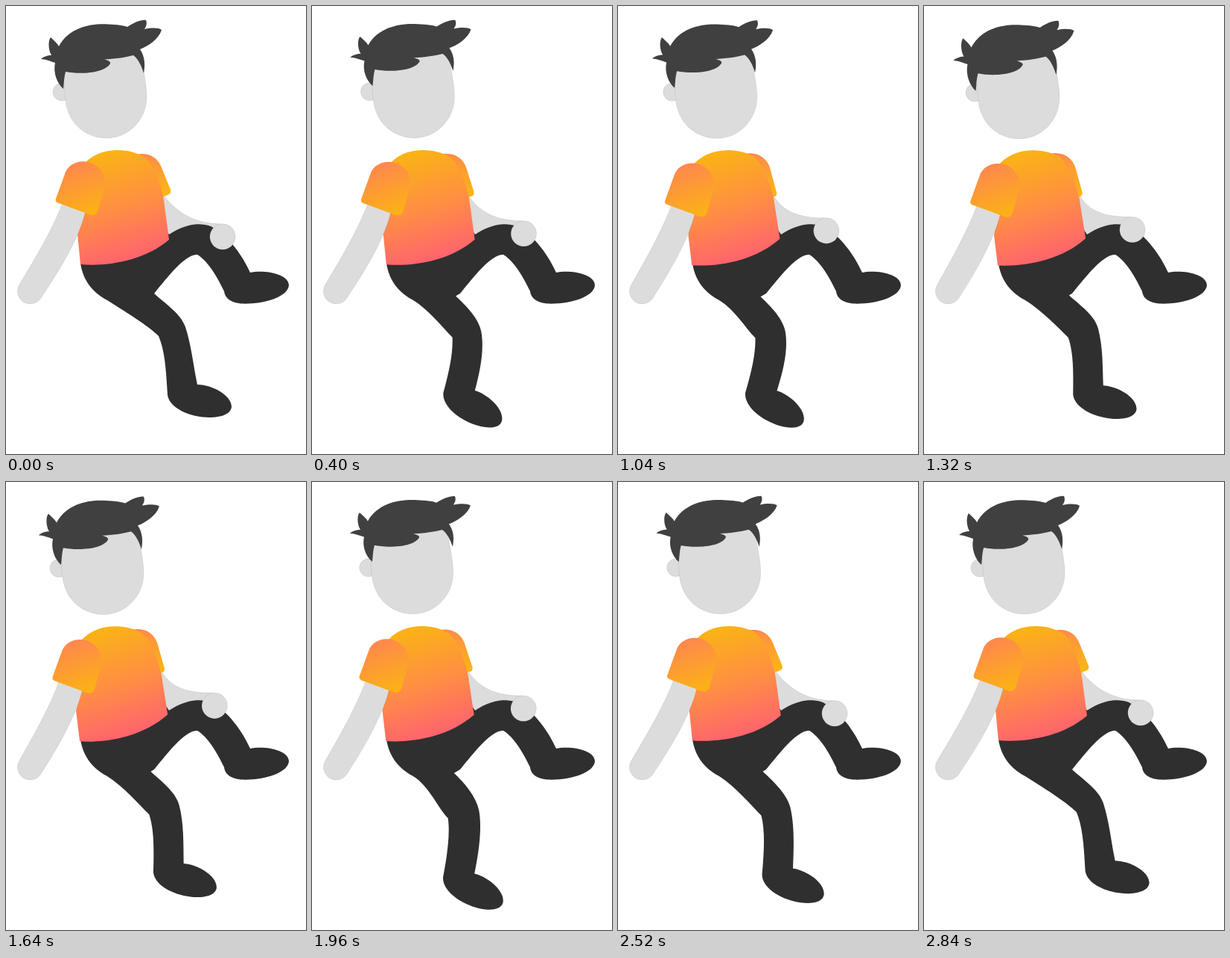
These frames come from a looping animation (403x600 px, 2.88 s). An HTML page:

```html
<!DOCTYPE html>
<html lang="en">
<head>
<meta charset="utf-8">
<title>Seated figure</title>
<style>
  html, body { margin: 0; width: 100%; height: 100%; overflow: hidden; background: #fff; }
  svg { display: block; width: 100%; height: 100%; }
  .skin { fill: #dcdcdc; stroke: #000; stroke-opacity: .1; stroke-width: .7; }
  .dark { fill: #2f2f2f; }
</style>
</head>
<body>
<svg viewBox="0 0 403 600">
  <defs>
    <linearGradient id="shirtFill" gradientUnits="userSpaceOnUse" x1="133" y1="195" x2="174" y2="342">
      <stop offset="0" stop-color="#fab414"/>
      <stop offset=".5" stop-color="#ff8f42"/>
      <stop offset="1" stop-color="#ff6170"/>
    </linearGradient>
    <linearGradient id="leftFill" gradientUnits="userSpaceOnUse" x1="92" y1="208" x2="115" y2="278">
      <stop offset="0" stop-color="#ff8650"/>
      <stop offset="1" stop-color="#fbb214"/>
    </linearGradient>
    <linearGradient id="rightFill" gradientUnits="userSpaceOnUse" x1="186" y1="198" x2="209" y2="252">
      <stop offset="0" stop-color="#ff8a4c"/>
      <stop offset="1" stop-color="#fbb414"/>
    </linearGradient>
  </defs>

  <path id="forearm" class="skin"/>
  <g id="rightShoulder">
    <path id="rightSleeve" fill="url(#rightFill)" d="M172 200C190 194 203 203 208 214L221 246C222 250 221 252 217 253L205 258Z"/>
  </g>

  <path class="dark" d="M100 344C103 368 118 385 136 394L170 402L199 385C218 362 240 333 257 333C272 342 285 365 293 382C294 392 303 397 315 398.500C345 400 379 390 380 374C380 358 345 353 328 357C318 335 300 308 275 295C258 289 240 293 219 306L215 300Z"/>
  <path id="leg" class="dark"/>

  <path id="torso" fill="url(#shirtFill)" d="M100 346L96 305C100 290 104 280 106 270V210C120 196 137 193 150 193C165 193 177 197 187 203C200 215 209 243 212 260L219 313C185 342 135 349 100 346Z"/>
  <path id="leftArm" class="skin" d="M75 266C62 300 38 340 18 373A17 17 0 0 0 47 391C75 350 98 310 106 278L100 250Z"/>
  <path id="leftSleeve" fill="url(#leftFill)" d="M67 258L79 225C86 203 120 202 131 226C134 233 133 239 132 243L124 272C122 279 119 281 113 279.500L72 264.500C67 263 66 261 67 258Z"/>
  <circle id="hand" class="skin" r="17.200"/>

  <g id="face" class="skin">
    <circle cx="75" cy="115" r="12"/>
    <path d="M79 80C78 110 79 122 80 127C84 160 110 177 135 177C165 177 189 152 189 122C189 110 187 100 185 88L180 60H90Z"/>
  </g>
  <path id="hair" fill="#404040" d="M77 111C69 104 63 90 66 76C60 74 52 71 47 71C50 68 56 66 61 66C56 57 57 45 60 42C64 46 69 50 71 54C85 28 115 23 138 24.500C150 25 158 26 163 28C172 22 182 18 188 19C190 24 188 28 186 31C196 29 205 29 209 32C205 45 190 54 180 58C187 68 187 80 185 90C182 80 177 70 171 66C160 69 145 71 132 71.500C138 73 141 75 140 77C133 90 100 92 80 88C78 95 78 102 77 111Z"/>
</svg>
<script>
const LOOP = 2880, STEP = 40;

// Rows are [time, ...values], eased with a half cosine between rows.
// Leg: back of knee x y, front of knee x y, heel x y, foot angle.
const LEG = [
  [0,    205, 442, 241, 430, 217, 521, 0],
  [720,  177, 445, 218, 442, 148, 515, 27.3],
  [1440, 195, 444, 235, 431, 204, 521, 0.6],
  [2160, 180, 451.5, 222, 442, 170, 531, 15.5],
  [2880, 205, 442, 241, 430, 217, 521, 0]
];
// Head: face shift, hair shift, hair height, drop.
const HEAD = [
  [0,    0,   0,    1,    0],
  [480,  2.6, 4.8,  .955, -.3],
  [760,  2,   5,    .95,  -.3],
  [1340, -7,  -7.5, 1.02, 1],
  [2060, 1,   4.5,  .95,  -.2],
  [2480, 2.7, 4.8,  .955, -.3],
  [2880, 0,   0,    1,    0]
];
const HAND = [
  [0,    291, 309],
  [720,  279.7, 302],
  [1440, 280, 299.5],
  [1560, 280, 299.5],
  [2520, 291, 310],
  [2880, 291, 309]
];

const part = Object.fromEntries(
  [...document.querySelectorAll('svg [id]')].map(el => [el.id, el]));
const set = (name, attr, value) => part[name].setAttribute(attr, value);

function sample(rows, t) {
  const i = rows.findIndex(row => row[0] > t);
  const a = rows[i - 1], b = rows[i];
  const k = (1 - Math.cos(Math.PI * (t - a[0]) / (b[0] - a[0]))) / 2;
  return a.slice(1).map((v, n) => v + (b[n + 1] - v) * k);
}

function legPath([kx, ky, fx, fy, hx, hy, angle]) {
  const c = Math.cos(angle * Math.PI / 180), s = Math.sin(angle * Math.PI / 180);
  const foot = (x, y) => [hx + x * c - y * s, hy + x * s + y * c];
  const [ax, ay] = foot(40, -14);
  const front = (ax - fx) / (ay - fy), back = (hx - kx) / (hy - ky);
  const bend = .22 + front / 2, ankle = 1.5 * front - .1;
  const calf = .25 + 1.2 * back, heel = 1.1 * back - .1;
  const cx = 199 + (kx - 205) * .36, cy = 385 + (205 - kx) * .22;
  return `M136 394L150 370L${cx + 6} 368L${cx} ${cy}` +
    `C${cx + 14} ${cy + 13} ${fx - bend * 18} ${fy - 18} ${fx} ${fy}` +
    `C${fx + bend * 25} ${fy + 25} ${ax - ankle * 25} ${ay - 25} ${ax} ${ay}` +
    `C${foot(58, -14)} ${foot(85, -1)} ${foot(86, 15)}` +
    `C${foot(86, 25)} ${foot(73, 30)} ${foot(56, 30)}` +
    `C${foot(33, 30)} ${foot(3, 19)} ${hx} ${hy}` +
    `C${hx - heel * 25} ${hy - 25} ${kx + calf * 22} ${ky + 22} ${kx} ${ky}` +
    `C${kx - 14} ${ky - 14} 158 408 136 394Z`;
}

function draw(t) {
  const lean = (1 - Math.cos(2 * Math.PI * t / LOOP)) / 2;
  const sway = `translate(${-lean} 0) rotate(${-1.5 * lean} 155 346)`;
  set('torso', 'transform', sway);
  set('rightShoulder', 'transform', sway);
  set('leftArm', 'transform', `rotate(${-1.6 * lean} 32 382)`);
  set('leftSleeve', 'transform', `translate(${-4.5 * lean} ${2.8 * lean})`);

  const [x, y] = sample(HAND, t);
  const pull = 291 - x;
  set('rightSleeve', 'transform', `rotate(${pull * .72} 185 212)`);
  set('hand', 'cx', x);
  set('hand', 'cy', y);
  set('forearm', 'd', `M${213 - pull * .3} 255C${228 - pull * .5} 275 ${x - 38} ${y - 17} ${x - 2} ${y - 17.2}` +
    `L${x} ${y}L260 310L205 318L200 260Z`);

  set('leg', 'd', legPath(sample(LEG, t)));

  const [face, hair, height, drop] = sample(HEAD, t);
  set('face', 'transform', `translate(${face} ${drop})`);
  set('hair', 'transform', `translate(${hair} ${24 + drop}) scale(1 ${height}) translate(0 -24)`);
}

const start = performance.now();
function tick() {
  const t = (performance.now() - start) % LOOP;
  draw(Math.floor(t / STEP) * STEP);
  requestAnimationFrame(tick);
}
tick();
</script>
</body>
</html>
```
